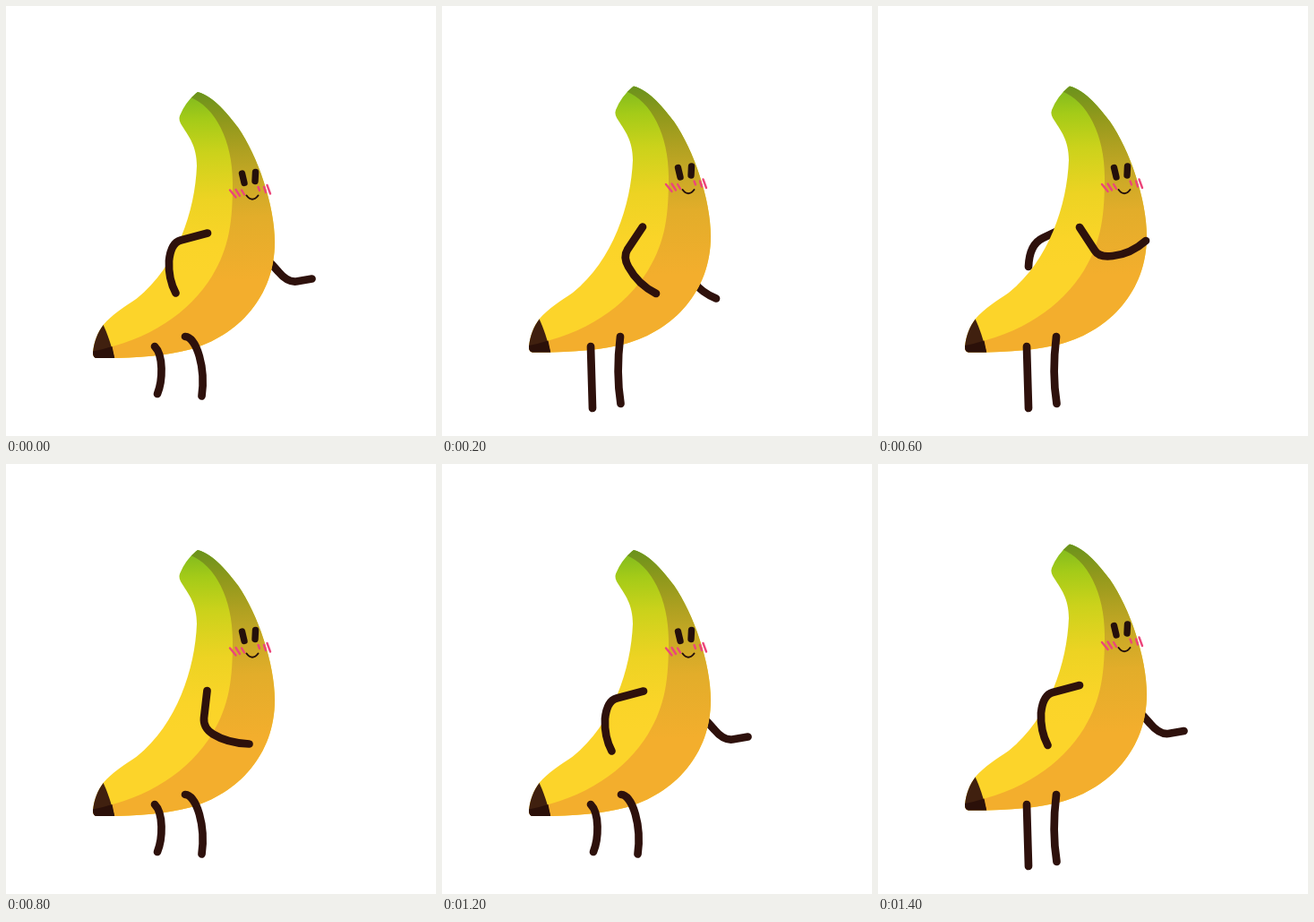
Write an HTML page that moves like this. It is 480 px wide and 480 px high and loops after 1.6 s.

```html
<!DOCTYPE html>
<html lang="en">
<head>
<meta charset="utf-8">
<title>Dancing banana</title>
<style>
  html, body { margin: 0; width: 100%; height: 100%; overflow: hidden; background: #fff; }
  svg { display: block; width: 100%; height: 100%; }
  .limb { fill: none; stroke: #2e110c; stroke-width: 8.7; stroke-linecap: round; stroke-linejoin: round; }
  .eye { fill: none; stroke: #24100b; stroke-width: 7.4; stroke-linecap: round; }
  .mouth { fill: none; stroke: #24100b; stroke-width: 2; stroke-linecap: round; }
  .blush { fill: none; stroke: #ec467b; stroke-width: 2.4; stroke-linecap: round; }
</style>
</head>
<body>
<svg viewBox="0 0 480 480">
  <defs>
    <linearGradient id="light" gradientUnits="userSpaceOnUse" x1="205" y1="90" x2="212" y2="290">
      <stop offset="0" stop-color="#7eb91f"/>
      <stop offset=".15" stop-color="#a4cb18"/>
      <stop offset=".34" stop-color="#cbd21b"/>
      <stop offset=".6" stop-color="#edd323"/>
      <stop offset=".85" stop-color="#fad428"/>
      <stop offset="1" stop-color="#fcd42a"/>
    </linearGradient>
    <linearGradient id="shade" gradientUnits="userSpaceOnUse" x1="250" y1="90" x2="257" y2="300">
      <stop offset="0" stop-color="#6c931c"/>
      <stop offset=".16" stop-color="#91991c"/>
      <stop offset=".32" stop-color="#b0a121"/>
      <stop offset=".48" stop-color="#caa926"/>
      <stop offset=".66" stop-color="#e2ad2a"/>
      <stop offset="1" stop-color="#f3ae2d"/>
    </linearGradient>
    <path id="skin" d="M214 89.5C232 94 249 116 259 129C281 161 300 216 300 257
      C300 318 259 362 205 377C178 384 143 387 101 386.5Q97 386 97 380
      C98 369 102 358 109 349C117 339 134 328 146 320C191 284 211 222 213 172
      C213 150 204 139 197 128Q192 121 194 116Q200 101 212 91Z"/>
    <clipPath id="inside"><use href="#skin"/></clipPath>
  </defs>
  <g id="bob">
    <path id="farArm" class="limb"/>
    <use href="#skin" fill="url(#light)"/>
    <g clip-path="url(#inside)">
      <path fill="url(#shade)" d="M205 95C234 106 253 145 253 190C253 232 250 262 230 295
        C204 337 157 369 90 380V400H320V80H215Z"/>
      <path fill="#40200f" d="M90 340L108 348Q116 365 121.500 388H90Z"/>
      <path fill="#2b1009" d="M90 380Q105 378 118.500 373.500L121.500 388H90Z"/>
    </g>
    <path class="eye" d="M263.500 180.500L266 191M278.500 179L278 189"/>
    <path class="mouth" d="M268.500 205Q275 213.500 281.500 205"/>
    <path class="blush" d="M250 199L256.500 207M256.500 198.500L261 205.500M263 199L266 204
      M281.500 195.500L283 199.500M288 195.500L290 201.500M291.500 193.500L295 203"/>
  </g>
  <path id="legs" class="limb"/>
  <path id="nearArm" class="limb"/>
</svg>
<script>
const STEP = 200;
const DROP = 6.5;

const arms = {
  back: {
    near: "M225 247L195 255Q184 258 182 278Q181 298 189.500 314",
    far: "M290 274.500L304 290Q314 302 324 301L341.500 298"
  },
  low: {
    near: "M224 246.500L207 272Q202 280 208 291Q219 311 239 321",
    far: "M281 308Q290 320 306 326.500"
  },
  front: {
    near: "M224.500 246.500L221 277Q220 288 231 295Q247 305 271.500 306",
    far: ""
  },
  high: {
    near: "M225 247L242 273Q247 281 262 279Q282 277 299 262",
    far: "M205 249L184 259Q169 266 168 291"
  }
};

const legs = {
  straight: "M166 380L168 449M199 369Q194 410 199.500 444",
  bent: "M166 380C176 390 175 418 169 433M200 369C213 370 223 404 218.500 435.500"
};

// Even steps crouch, odd steps stand.
const swing = ["back", "low", "front", "high", "front", "low", "back", "back"];

const el = id => document.getElementById(id);

function draw(time) {
  const step = Math.floor(time / STEP) % swing.length;
  const down = step % 2 === 0;
  const pose = arms[swing[step]];
  const shift = `translate(0 ${down ? DROP : 0})`;
  el("bob").setAttribute("transform", shift);
  el("nearArm").setAttribute("transform", shift);
  el("nearArm").setAttribute("d", pose.near);
  el("farArm").setAttribute("d", pose.far);
  el("legs").setAttribute("d", down ? legs.bent : legs.straight);
}

const start = performance.now();
function tick() {
  draw(performance.now() - start);
  requestAnimationFrame(tick);
}
tick();
</script>
</body>
</html>
```
